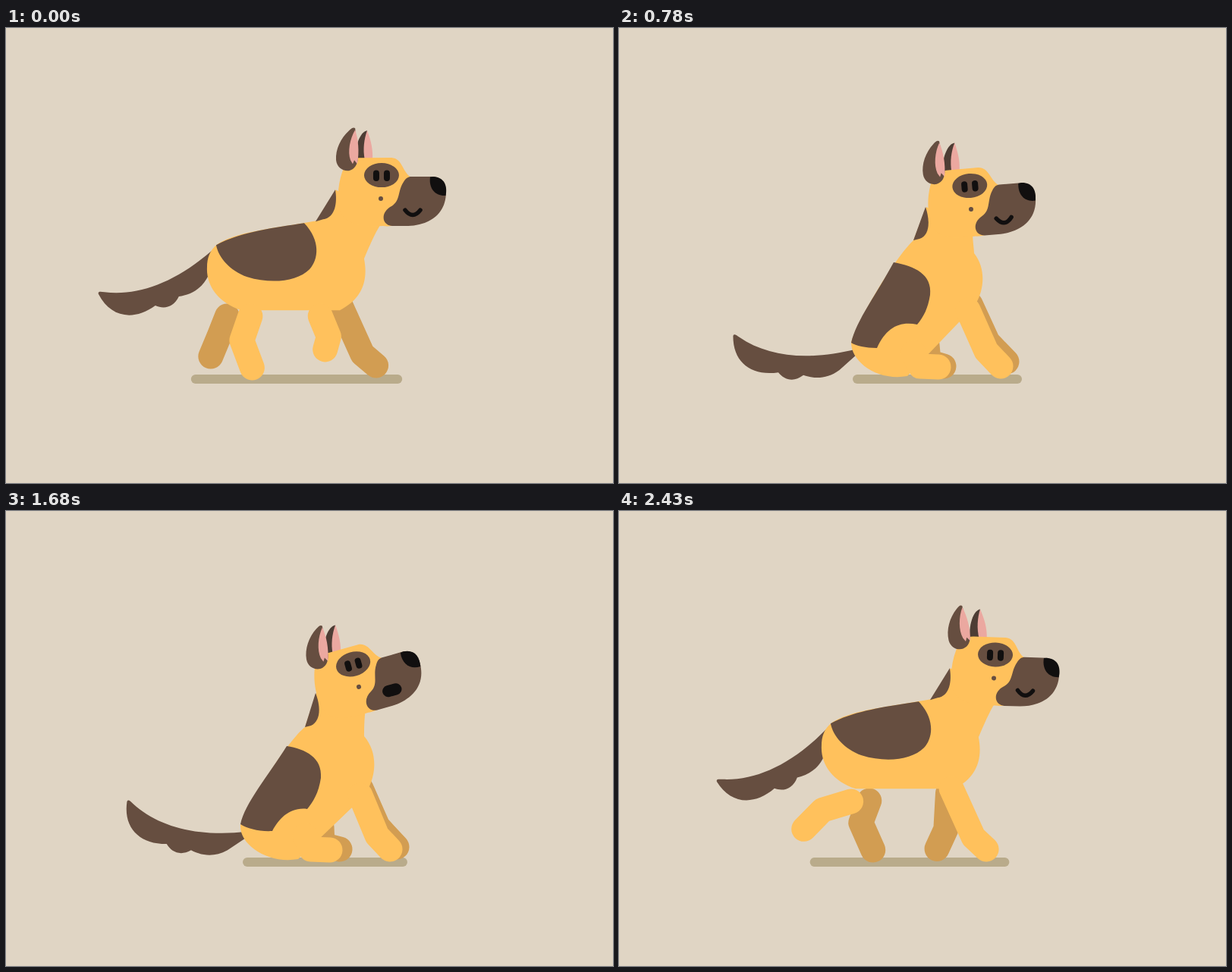
An HTML page that plays this animation: 800 px wide and 600 px high, repeating every 2.46 s.

```html
<!DOCTYPE html>
<html lang="en">
<head>
<meta charset="utf-8">
<title>Dog</title>
<style>
  html, body { margin: 0; height: 100%; overflow: hidden; background: #e0d5c4; }
  svg { display: block; width: 800px; height: 600px; }
  path { stroke-linecap: round; stroke-linejoin: round; }
  .coat { fill: #ffc15c; }
  .dark { fill: #664e40; }
  .pink { fill: #eba8a0; }
  .black { fill: #110f0f; }
  .line { fill: none; stroke: #110f0f; }
  .leg { fill: none; stroke: #ffc15c; stroke-width: 33; }
  .far { stroke: #d29d52; }
</style>
</head>
<body>
<svg viewBox="0 0 800 600">
  <path id="shadow" fill="none" stroke="#b9ab8b" stroke-width="12"/>
  <path id="farHind" class="leg far"/>
  <path id="farFront" class="leg far"/>
  <g id="tail">
    <path class="dark" d="M122,351C121,347 125,348 130,348.500C175,354 225,335 274,291L278,297L267,326C258,345 242,352 228,354C221,369 208,371 197,366C168,387 138,382 122,351Z"/>
  </g>
  <g id="torso">
    <path id="body" class="coat"/>
    <path id="saddle" class="dark"/>
    <path id="mane" class="dark"/>
  </g>
  <path id="nearHind" class="leg"/>
  <path id="nearFront" class="leg"/>
  <g id="head">
    <g id="farEar">
      <path fill="#4d3d34" d="M476,135C467,136 459,156 461,176L474,176Z"/>
      <path class="pink" d="M476,135C481,148 484,160 483,174L473,174C470,160 472,146 476,135Z"/>
    </g>
    <path class="coat" d="M440,240C436,222 438,205 443,190C447,178 455,171 466,171H508C523,172 522,190 534,197L540,240C520,262 505,262 497,261C470,262 445,260 440,240Z"/>
    <g id="nearEar">
      <path class="dark" d="M460,132C458,130 455,132 452,135C441,145 434,160 435,174C436,184 444,189 452,188C460,186 463,180 464,171Z"/>
      <path class="pink" d="M460,134C464,146 466,162 463,179L459,174L457,179L454,174C450,163 453,146 460,134Z"/>
    </g>
    <ellipse class="dark" cx="495" cy="194" rx="23" ry="16"/>
    <path class="line" stroke-width="8" d="M488,191.500V198M502,191.500V198"/>
    <circle class="dark" cx="494" cy="225" r="3"/>
    <path class="dark" d="M534,196H562C577,197 580,208 580,216C580,248 555,260 530,261H509C495,260 493,243 508,235C520,228 516,215 524,203C527,198 530,196 534,196Z"/>
    <path class="black" d="M559,196.500C557,212 566,222 579.500,221C582,208 578,197 563,196Z"/>
    <path id="mouth" class="line"/>
  </g>
  <path id="barks" class="line" stroke-width="8"/>
</svg>
<script>
const LOOP = 2460, STRIDE = 380;
const clamp = v => Math.max(0, Math.min(1, v));
const lerp = (a, b, k) => a + (b - a) * k;
const NUMBER = /-?\d+(\.\d+)?/g;

// Blend two strings that differ only in their numbers.
function mix(a, b, k) {
  const target = b.match(NUMBER);
  let i = 0;
  return a.replace(NUMBER, n => lerp(+n, +target[i++], k).toFixed(2));
}

const bar = (x1, x2) => `M${x1 + 6},463L${x2 - 6},463`;
const headAt = (x, y, angle, near, far) => ({
  head: `translate(${x - 494} ${y - 225}) rotate(${angle} 494 225)`,
  nearEar: `rotate(${near} 450 186)`,
  farEar: `rotate(${far} 470 173)`
});
const tailAt = (x, y, angle) => `translate(${x - 270} ${y - 294}) rotate(${angle} 270 294)`;
const still = 'translate(0 0)';

const stand = {
  body: 'M276,287C300,268 355,264 409,254L435,213L497,255C490,262 480,285 472,304C478,335 468,358 440,372L310,372C280,362 264,340 265,316C265,302 269,294 276,287Z',
  saddle: 'M277,286C310,268 355,263 393,257C415,280 412,305 400,318C384,334 350,338 318,328C295,320 280,302 277,286Z',
  mane: 'M434,213L408,255L418,252C434,250 437,230 434,213Z'
};

const crouch = {
  body: 'M280,307C305,287 355,280 407,262L430,219L490,258C486,272 480,290 477,308C482,340 466,366 436,378L318,388C286,380 270,355 271,335C272,320 275,313 280,307Z',
  saddle: 'M280,307C310,285 355,280 392,267C417,288 415,312 401,328C385,347 352,352 325,347C302,340 285,322 280,307Z',
  mane: 'M429,219L406,262L416,260C432,256 433,236 429,219Z',
  nearFront: 'M446,372L469,432L485,446',
  farFront: 'M456,380L483,399L484,416',
  nearHind: 'M337,385L335,415L354,445',
  farHind: 'M322,392L320,415L336,448',
  torso: still, tail: tailAt(273, 318, 2), shadow: bar(270, 506),
  ...headAt(490, 228, -2.5, -8, 10)
};

const sit = {
  body: 'M306,415C315,385 362,305 388,280L405,236L466,268C466,280 468,292 468,297C490,325 478,368 448,388L380,459C340,466 306,440 306,415C306,415 306,415 306,415Z',
  saddle: 'M306,415C313,385 340,350 362,309C390,314 413,325 410,352C407,370 402,380 393,391C370,386 352,395 340,422C325,422 312,419 306,415Z',
  mane: 'M404,236L388,280L396,278C410,273 410,254 404,236Z',
  nearFront: 'M460,372L484,426L503,446',
  farFront: 'M463,364L486,414L511,440',
  nearHind: 'M388,428L397,446L421,447',
  farHind: 'M406,418L408,440L428,446',
  torso: still, tail: tailAt(308, 424, 27.5), shadow: bar(308, 531),
  ...headAt(464, 239, -5, 0, 6)
};

const bark = {
  body: 'M310,412C322,382 372,302 394,285L409,240L474,260C472,275 472,290 472,297C496,325 486,370 455,392L385,459C345,466 308,440 309,415C309,414 309,413 310,412Z',
  saddle: 'M309,413C315,385 345,350 370,310C395,314 417,325 415,352C412,372 405,383 397,393C375,390 360,405 351,422C335,423 318,419 309,413Z',
  mane: 'M408,240L394,285L402,283C415,277 415,258 408,240Z',
  nearFront: 'M467,375L489,428L506,446',
  farFront: 'M468,366L490,416L515,443',
  nearHind: 'M394,428L402,446L427,447',
  farHind: 'M416,417L417,440L440,446',
  torso: still, tail: tailAt(312, 420, 40), shadow: bar(313, 527),
  ...headAt(466, 227, -23, 14, 20)
};

const lift = {
  ...bark, tail: tailAt(313, 423, 35.5), shadow: bar(312, 529),
  ...headAt(465, 232, -15.6, 10, 16)
};

const rise = {
  body: 'M298,386C310,362 370,300 398,273L416,231L478,262C475,275 476,290 476,297C500,325 490,370 447,387L360,441C325,443 297,415 297,395C297,392 297,389 298,386Z',
  saddle: 'M297,385C305,362 345,325 375,294C403,303 420,325 412,350C408,365 398,372 383,382C368,379 352,388 343,399C322,398 303,394 297,385Z',
  mane: 'M415,231L398,273L406,271C421,265 420,248 415,231Z',
  nearFront: 'M460,374L480,424L498,446',
  farFront: 'M462,372L483,414L504,437',
  nearHind: 'M360,410L374,430L398,446',
  farHind: 'M397,408L398,425L413,446',
  torso: still, tail: tailAt(297, 395, 23), shadow: bar(299, 526),
  ...headAt(475, 233, -4, -4, 8)
};

// Stride keys: phase, then x y of upper joint, lower joint and foot
const front = [[0, 441, 366, 470, 430, 488, 445], [.2, 438, 368, 452, 420, 455, 447],
  [.4, 434, 372, 431, 420, 419, 446], [.5, 414, 380, 425, 407, 420, 424],
  [.7, 432, 372, 455, 400, 470, 415], [.9, 438, 366, 467, 430, 484, 446], [1, 441, 366, 470, 430, 488, 445]];
const hind = [[0, 322, 380, 311, 412, 325, 448], [.2, 314, 380, 300, 412, 278, 448], [.3, 308, 382, 288, 402, 246, 438],
  [.4, 306, 383, 268, 394, 243, 419], [.5, 291, 380, 281, 405, 269, 433], [.7, 318, 380, 318, 404, 330, 436],
  [.9, 330, 382, 319, 411, 335, 447], [1, 322, 380, 311, 412, 325, 448]];

function stride(keys, phase) {
  const p = phase % 1, i = keys.findIndex(key => key[0] > p);
  const a = keys[i - 1], b = keys[i], k = (p - a[0]) / (b[0] - a[0]);
  const [, x1, y1, x2, y2, x3, y3] = a.map((v, j) => lerp(v, b[j], k).toFixed(2));
  return `M${x1},${y1}L${x2},${y2}L${x3},${y3}`;
}

function walk(t) {
  const p = t < 1500 ? .5 + t / STRIDE : 10.9 + (t - 2430) / STRIDE;
  const dy = +(5 * Math.sin(4 * Math.PI * (p - .5) + .645) - 3).toFixed(2), dx = -dy / 3;
  return {
    ...stand,
    nearFront: stride(front, p), farFront: stride(front, p + .5),
    nearHind: stride(hind, p + .5), farHind: stride(hind, p),
    torso: `translate(${dx.toFixed(2)} ${dy})`,
    tail: tailAt(+(270 + dx).toFixed(2), 294 + dy, (dy * .8).toFixed(2)),
    shadow: bar(244 - dy * 1.33, 522 + dy * 1.33),
    ...headAt(494, +(225 + dy * .8).toFixed(2), (-dy / 3).toFixed(2), (dy * 2).toFixed(2), (dy * .8).toFixed(2))
  };
}

const easeIn = k => k ** 1.6, easeOut = k => 1 - (1 - k) ** 1.6;
const timeline = [
  [0, walk], [490, walk, easeIn], [570, crouch, easeIn], [780, sit, easeOut], [1080, sit, easeIn],
  [1200, lift, easeIn], [1320, bark, easeOut], [1530, sit, easeOut], [1680, lift, easeIn],
  [1800, bark, easeOut], [1980, sit, easeOut], [2100, rise, easeIn], [2240, walk, easeOut], [LOOP, walk]
];

const el = id => document.getElementById(id);

function drawBark(t) {
  const u = t >= 1120 && t < 2080 ? (t - 1120) % 480 : 999;
  const flat = clamp(Math.min(u / 50, (300 - u) / 80));
  const width = 5.5 + (u < 210 ? 10.5 * Math.sin(Math.PI * u / 210) : 0);
  const half = lerp(10, 8 - .3 * Math.max(0, width - 6), flat);
  const x = lerp(536, 535, flat), y = lerp(240, 241, flat);
  el('mouth').setAttribute('d', `M${x - half},${y}Q${x},${y + lerp(13, 0, flat)} ${x + half},${y}`);
  el('mouth').setAttribute('stroke-width', width);

  const lead = easeOut(clamp((u - 85) / 80)), trail = clamp((u - 115) / 85);
  const rays = [[572, 173, 597, 150], [590, 194, 643.5, 173], [585, 222, 628.5, 218]];
  const ray = ([x1, y1, x2, y2]) => `M${lerp(x1, x2, trail)},${lerp(y1, y2, trail)}L${lerp(x1, x2, lead)},${lerp(y1, y2, lead)}`;
  el('barks').setAttribute('d', u > 85 && u < 235 ? rays.map(ray).join('') : '');
}

function draw(now) {
  const t = now % LOOP;
  const i = timeline.findIndex(key => key[0] > t);
  const [start, from] = timeline[i - 1], [end, to, ease = k => k] = timeline[i];
  const poseOf = key => key === walk ? walk(t) : key;
  const a = poseOf(from), b = poseOf(to), k = ease((t - start) / (end - start));
  for (const id in a) {
    const isTransform = /^[tr]/.test(a[id]);
    el(id).setAttribute(isTransform ? 'transform' : 'd', mix(a[id], b[id], k));
  }
  drawBark(t);
}

const begin = performance.now();
function tick() {
  draw(performance.now() - begin);
  requestAnimationFrame(tick);
}
tick();
</script>
</body>
</html>
```
